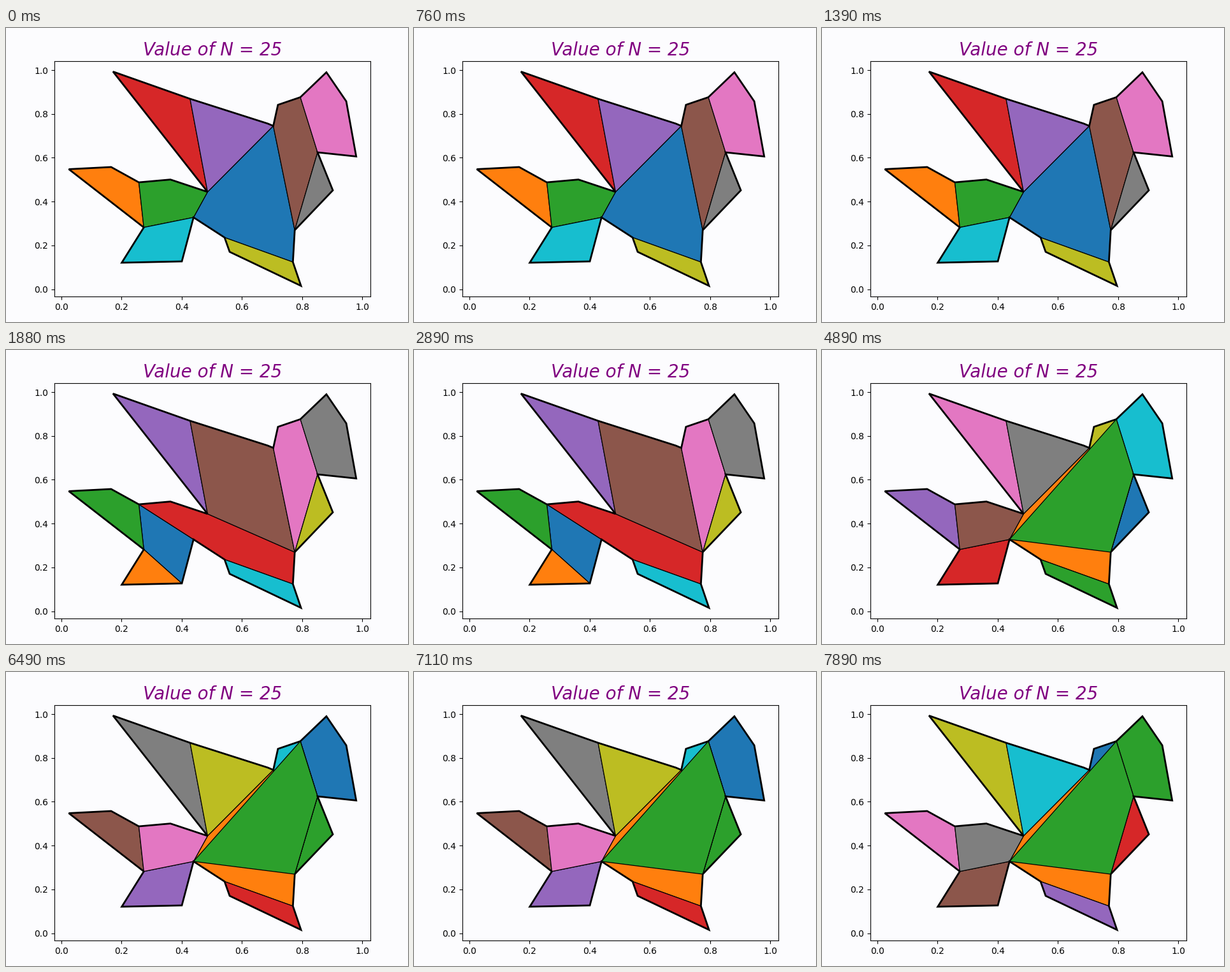
Recreate the animation shown at these times as a matplotlib script. Size 631 by 461 pixels, loop 8 s.

```python
import numpy as np
import matplotlib.pyplot as plt
from matplotlib.animation import FuncAnimation

W, H, DPI = 631, 461, 100
LOOP, STEP = 8000, 40
PAPER = "#fcfcfe"

# Outline vertices, clockwise, named a..y
OUTLINE = np.array([
    (.172, .993), (.428, .869), (.686, .756), (.7045, .7454), (.720, .8415),
    (.7945, .8763), (.881, .990), (.947, .8574), (.980, .606), (.8516, .6247),
    (.9024, .4515), (.7758, .2697), (.7697, .1242), (.7966, .0157),
    (.5595, .1708), (.5426, .2363), (.4395, .3279), (.4007, .1272),
    (.201, .1213), (.2743, .2822), (.0252, .5479), (.1657, .5578),
    (.2578, .4879), (.3626, .5007), (.4862, .4443)])

CORE = "ydlmpq"
RIM = ["uvwt", "wxyqt", "aby", "bcdy", "defjl", "fghij", "jkl", "mnop", "qrst"]
WEDGE = ("qfjl", 2)


def in_order(pieces):
    """Pair every piece with its place in the colour cycle."""
    return [(piece, i) for i, piece in enumerate(pieces)]


def start_at(first):
    """First rim piece, then the core, then the rest clockwise."""
    rest = RIM[first + 1:] + RIM[:first]
    return in_order([RIM[first], CORE] + rest)


STATES = [
    (0, in_order([CORE] + RIM)),
    (1880, in_order(["wqrt", "trs", "uvwt", "wxylmpq", "aby", "bcdly",
                     "defjl", "fghij", "jkl", "mnop"])),
    (3110, start_at(7)),
    (4360, start_at(6) + [WEDGE]),
    (6490, start_at(5) + [WEDGE]),
    (7600, start_at(4) + [WEDGE]),
]

fig = plt.figure(figsize=(W / DPI, H / DPI), dpi=DPI, facecolor=PAPER)
ax = fig.add_axes([76 / W, 39.8 / H, 496 / W, 369.6 / H], facecolor=PAPER)
ax.set_title("Value of N = 25", fontsize=20, color="purple", style="italic")
ax.set_xlim(-.0227, 1.0272)
ax.set_ylim(-.0334, 1.0419)
ax.set_xticks(np.arange(0, 1.1, .2))
ax.set_yticks(np.arange(0, 1.1, .2))


def corners(piece):
    return OUTLINE[[ord(c) - ord("a") for c in piece]]


def make_group(pieces):
    group = []
    for z, (piece, color) in enumerate(pieces):
        patch = plt.Polygon(corners(piece), facecolor=f"C{color}",
                            edgecolor="black", lw=.9, zorder=1 + z / 100)
        group.append(ax.add_patch(patch))
    return group


groups = [make_group(pieces) for _, pieces in STATES]
starts = [t for t, _ in STATES]
ax.add_patch(plt.Polygon(OUTLINE, fill=False, edgecolor="black", lw=2, zorder=2))


def update(i):
    now = np.searchsorted(starts, i * STEP + STEP / 2, side="right") - 1
    for k, group in enumerate(groups):
        for patch in group:
            patch.set_visible(k == now)
    return [patch for group in groups for patch in group]


anim = FuncAnimation(fig, update, frames=LOOP // STEP, interval=STEP,
                     repeat=True, repeat_delay=0, blit=False)
plt.show()
```
